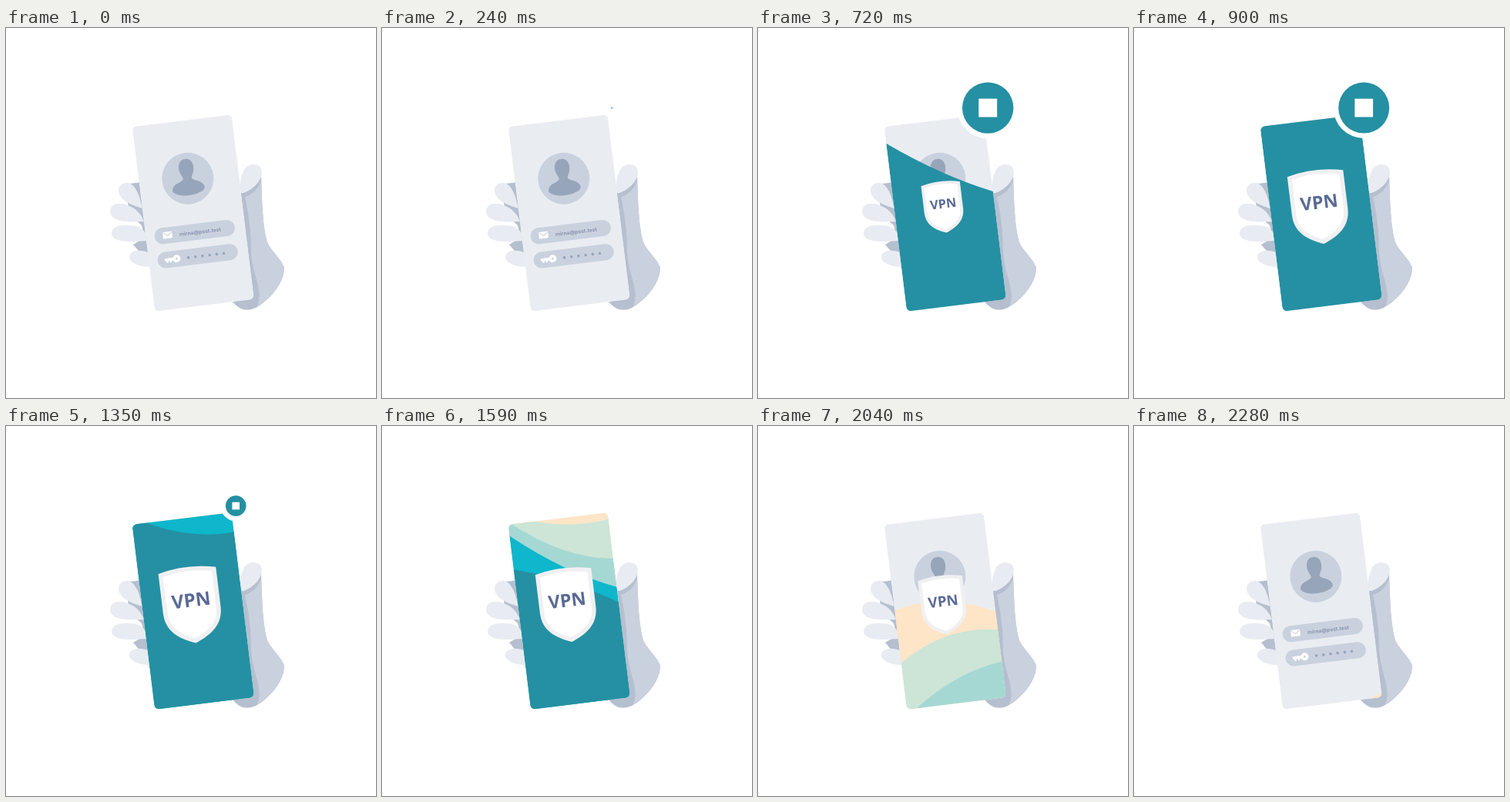
An HTML page for the animation above (2.31 s loop, 480 by 480 pixels).

```html
<!DOCTYPE html>
<html lang="en">
<head>
<meta charset="utf-8">
<style>
  html, body { margin: 0; width: 100%; height: 100%; overflow: hidden; background: #fff; }
  svg { display: block; width: 100%; height: 100%; }
  text { text-anchor: middle; }
</style>
</head>
<body>
<svg viewBox="0 0 480 480">
  <defs>
    <clipPath id="screen"><rect width="130" height="241.500" rx="6"/></clipPath>
  </defs>

  <g id="hand">
    <path fill="#b5bfcf" d="M300 212L331 188C332 225 333 255 338 275C342 289 356 297 361 311C360 334 340 354 324 363C312 368 303 366 294 355Z"/>
    <path fill="#cad1de" d="M331 198C332 225 333 255 338 275C342 289 356 297 361 311C360 334 341 352 326 361C335 340 319 320 318 290C318 260 314 238 310 219C319 217 328 208 331 198Z"/>
    <path fill="#e8ecf2" d="M303 214C303 200 306 186 311 181C318 174 333 176 332 188C331 200 318 211 308 214Z"/>
    <path fill="#b5bfcf" d="M160 202L176 200L190 310L178 296L165 281L180 272L176 256L165 246L158 228Z"/>
    <g fill="#e8ecf2">
      <path d="M146 211C146 202 156 198 163 203C171 209 174 222 177 234C168 231 147 226 146 211Z"/>
      <path d="M135 238C136 227 148 226 158 230C169 234 175 241 179 251C165 252 135 253 135 238Z"/>
      <path d="M137 267C137 257 149 255 160 256C170 256 176 259 181 266L182 276C168 277 138 280 137 267Z"/>
      <path d="M160 297C161 288 173 287 184 291L187 310C176 310 160 306 160 297Z"/>
    </g>
  </g>

  <g transform="translate(163.6 128) rotate(-7)">
    <g clip-path="url(#screen)">
      <rect width="130" height="242" fill="#e9edf2"/>
      <g fill="#cad1de">
        <circle cx="63.500" cy="75.500" r="33.500"/>
        <rect x="11.500" y="135" width="105" height="21" rx="10.500"/>
        <rect x="11.500" y="166.500" width="105" height="21" rx="10.500"/>
      </g>
      <g fill="#97a5bb">
        <path d="M63 50C70 50 73 56 72.500 63C72 69 69 72 68.500 75C69 80 84 79 84 90C82 94 74 97.500 63 97.500C52 97.500 44 94 42 90C42 79 57 80 57.500 75C57 72 54 69 53.500 63C53 56 56 50 63 50Z"/>
        <g id="dots"></g>
      </g>
      <rect x="22.500" y="141" width="12" height="8.500" rx="1" fill="#fff"/>
      <path d="M23 142L28.500 146L34 142" fill="none" stroke="#cad1de"/>
      <path d="M21 175H33V179H29.500V181H27.500V179H25.500V181H23V179H21Z" fill="#fff"/>
      <circle cx="36.500" cy="177" r="3.200" fill="none" stroke="#fff" stroke-width="3.600"/>
      <text x="71" y="148.500" font-family="Inter, sans-serif" font-size="6.600" font-weight="700" fill="#8795b0">mirna@post.test</text>
      <g id="waves"></g>
    </g>
    <g id="shield">
      <path d="M27 69Q63.500 60 100 69V119C100 142 84 153 63.500 161C43 153 27 142 27 119Z" fill="#f0f0f2"/>
      <path d="M32.500 73.500Q63.500 66 94.500 73.500V119C94.500 138 82 147.500 63.500 155C45 147.500 32.500 138 32.500 119Z" fill="#fff"/>
      <text x="64" y="115" font-family="'Open Sans', sans-serif" font-size="23.500" font-weight="700" fill="#5a6a95">VPN</text>
    </g>
  </g>

  <g transform="translate(298.2 103.6)">
    <circle id="ring" fill="#fff"/>
    <circle id="badge" fill="#2590a3"/>
    <rect id="mark" fill="#fff"/>
  </g>
</svg>

<script>
const LOOP = 2310;
const $ = id => document.getElementById(id);

function set(el, attrs) {
  for (const name in attrs) el.setAttribute(name, attrs[name]);
}

function add(parent, tag, attrs) {
  const el = document.createElementNS('http://www.w3.org/2000/svg', tag);
  set(el, attrs);
  parent.append(el);
  return el;
}

for (let i = 0; i < 6; i++) add($('dots'), 'circle', { cx: 51.7 + i * 9.25, cy: 177.5, r: 1.8 });

// Back to front; the front colour moves first
const COLORS = ['#fee5c7', '#cce5d6', '#a6d8d3', '#0eb7cb', '#2590a3'];
const waves = COLORS.map(fill => add($('waves'), 'path', { fill }));

// Edge height at the left, middle and right of the screen
const STEP = 90;
const EDGE = [
  [-30, -25, -30], [-14, 7, 8], [-4, 40, 60], [14, 63, 97], [58, 82, 117],
  [111, 108, 129], [180, 152.5, 153], [250, 211, 194], [325, 287, 255]
];

function wavePath(phase) {
  const p = Math.min(Math.max(phase / STEP, 0), EDGE.length - 1);
  const i = Math.min(Math.floor(p), EDGE.length - 2);
  const [left, mid, right] = EDGE[i].map((y, k) => y + (EDGE[i + 1][k] - y) * (p - i));
  return `M0 ${left}Q65 ${2 * mid - (left + right) / 2} 130 ${right}V400H0Z`;
}

// Eased value between [time, value] keys
function track(keys, t) {
  if (t <= keys[0][0]) return keys[0][1];
  for (let i = 1; i < keys.length; i++) {
    const [t0, a] = keys[i - 1], [t1, b] = keys[i];
    if (t < t1) {
      const x = (t - t0) / (t1 - t0);
      return a + (b - a) * x * x * (3 - 2 * x);
    }
  }
  return keys[keys.length - 1][1];
}

const BADGE = [[210, 0], [510, 38.2], [750, 33], [1080, 33], [1560, 0]];
const SHIELD = [[600, 0], [800, 1.06], [900, 1], [1350, 1.03], [1590, 1], [1980, 1], [2190, 0]];

function draw(t) {
  const rising = t < 1100;
  waves.forEach((wave, i) => {
    const front = i === waves.length - 1;
    const delay = (waves.length - 1 - i) * STEP;
    const phase = rising ? 687 - (t - 510) * 1.9 : t - 1230 - delay;
    set(wave, { d: rising && !front ? '' : wavePath(phase) });
  });

  const s = track(SHIELD, t);
  set($('shield'), { transform: `translate(63.5 113) scale(${s}) translate(-63.5 -113)` });

  const r = track(BADGE, t), side = r * 0.72;
  set($('ring'), { r: r + Math.min(r, 6.5) });
  set($('badge'), { r });
  set($('mark'), { x: -side / 2, y: -side / 2, width: side, height: side });
}

function frame() {
  draw(performance.now() % LOOP);
  requestAnimationFrame(frame);
}
frame();
</script>
</body>
</html>
```
